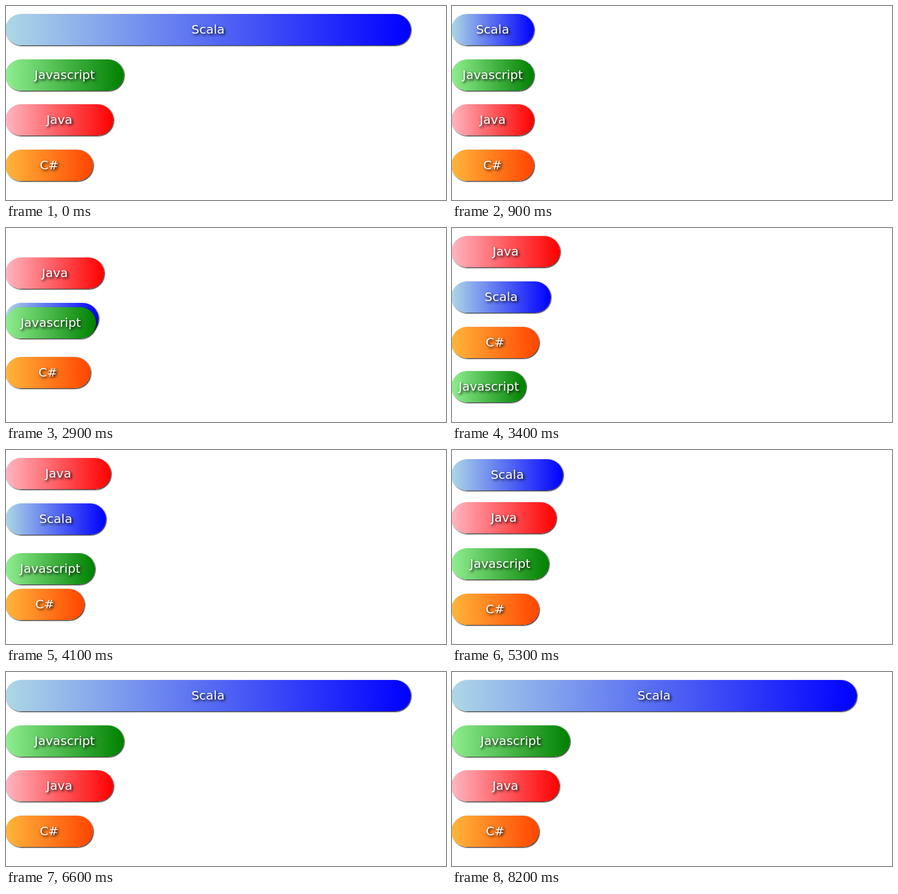
Write an HTML page that moves like this. It is 713x316 px and loops after 8300 ms.

```html
<!DOCTYPE html>
<html lang="en">
<head>
<meta charset="utf-8">
<title>Language bar race</title>
<style>
  html, body { margin: 0; width: 100%; height: 100%; overflow: hidden; background: #fff; }
  .stage { position: relative; width: 713px; height: 316px; overflow: hidden; }
  .bar {
    position: absolute;
    left: -1px;
    height: 51px;
    border-radius: 25.5px;
    box-shadow: 1px 1px 2px #000;
    color: #fff;
    font: 20px/51px "DejaVu Sans", sans-serif;
    text-align: center;
    text-shadow: 2px 2px 4px #000;
    white-space: nowrap;
  }
</style>
</head>
<body>
<div class="stage" id="stage"></div>
<script>
const LOOP = 8300, RESET = 500;
const TOP = 13, PITCH = 73.6;
const RATE = 0.013; // critically damped spring, per ms

const BARS = [
  ["Scala", "lightblue", "blue"],
  ["Javascript", "lightgreen", "green"],
  ["Java", "lightpink", "red"],
  ["C#", "#ffb63c", "orangered"],
];

// Each step gives new targets for every bar.
const STEPS = [
  { at: RESET, width: [131, 131, 131, 131], slot: [0, 1, 2, 3] },
  { at: 770, width: [136, 136, 136, 136], slot: [0, 1, 2, 3] },
  { at: 1817, width: [146.5, 159, 153, 136], slot: [2, 0, 1, 3] },
  { at: 2766, width: [146.5, 159, 153, 136], slot: [1, 3, 0, 3] },
  { at: 2813, width: [161.5, 121, 176, 142], slot: [1, 3, 0, 2] },
  { at: 3810, width: [163.3, 148, 170.5, 126], slot: [1, 2, 0, 3] },
  { at: 4870, width: [181.5, 158.3, 170, 142], slot: [0, 2, 1, 3] },
  { at: 5880, width: [657, 192, 175, 142], slot: [0, 1, 2, 3] },
];

const stage = document.getElementById("stage");
const nodes = BARS.map(([name, from, to]) => {
  const node = document.createElement("div");
  node.className = "bar";
  node.textContent = name;
  node.style.backgroundImage = `linear-gradient(to right, ${from}, ${to})`;
  return stage.appendChild(node);
});

function spring(ms) {
  if (ms <= 0) return 0;
  const x = RATE * ms;
  return 1 - (1 + x) * Math.exp(-x);
}

// Sum of the spring responses to every target change so far.
function valueAt(key, i, t) {
  let value = STEPS[0][key][i];
  for (let k = 1; k < STEPS.length; k++) {
    const change = STEPS[k][key][i] - STEPS[k - 1][key][i];
    value += change * spring(t - STEPS[k].at);
  }
  return value;
}

function render(time) {
  let t = time % LOOP;
  if (t < RESET) t += LOOP;
  const step = STEPS.filter(s => s.at <= t).pop();
  nodes.forEach((node, i) => {
    node.style.width = valueAt("width", i, t) + "px";
    node.style.top = TOP + PITCH * valueAt("slot", i, t) + "px";
    node.style.zIndex = step.slot[i];
  });
}

const start = performance.now();
function tick() {
  render(performance.now() - start);
  requestAnimationFrame(tick);
}
tick();
</script>
</body>
</html>
```
